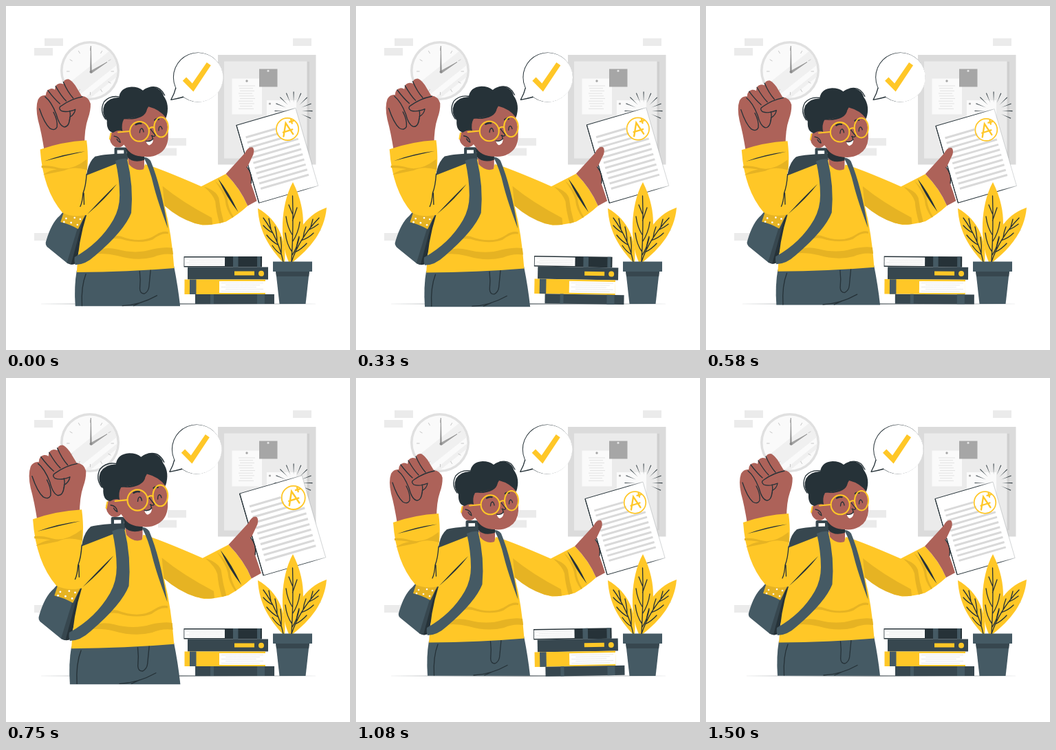
An HTML page for the animation above (1.54 s loop, 500x500 px).

```html
<!DOCTYPE html>
<html lang="en">
<head>
<meta charset="utf-8">
<title>Top grade</title>
<style>
  html, body { margin: 0; width: 100%; height: 100%; overflow: hidden; background: #fff; }
  svg { display: block; width: 100%; height: 100%; }
  .y { fill: #ffc727; }
  .shade { fill: #e6b323; }
  .ink { fill: #263238; }
  .slate { fill: #455a64; }
  .deep { fill: #37474f; }
  .skin { fill: #ad6259; }
  .line { fill: none; stroke: #263238; stroke-width: 1.3; stroke-linecap: round; stroke-linejoin: round; }
  .gold { fill: none; stroke: #ffc727; stroke-width: 2; stroke-linecap: round; }
</style>
</head>
<body>
<svg viewBox="0 0 500 500">
  <defs>
    <clipPath id="face"><circle cx="122" cy="94" r="39.5"/></clipPath>
    <linearGradient id="edge">
      <stop offset="0" stop-color="#263238"/>
      <stop offset=".75" stop-color="#263238"/>
      <stop offset="1" stop-color="#263238" stop-opacity=".2"/>
    </linearGradient>
  </defs>

  <g id="bricks" fill="#ebebeb"></g>

  <g id="clock">
    <circle cx="122" cy="94" r="43" fill="#e0e0e0"/>
    <circle cx="122" cy="94" r="39.5" fill="#fafafa"/>
    <g clip-path="url(#face)" fill="#f0f0f0">
      <path d="M84,118 L152,64 L166,82 L98,136Z"/>
      <path d="M106,140 L168,90 L170,96 L112,142Z"/>
    </g>
    <g id="ticks" stroke="#c7c7c7" stroke-width="1"></g>
    <path d="M123.3,58 L124.3,96 L122.6,96Z" fill="#8a8a8a" stroke="#8a8a8a" stroke-width=".6"/>
    <path d="M122.5,95 L147,81.5 L124.5,97.3Z" fill="#a6a6a6" stroke="#8a8a8a" stroke-width=".7"/>
    <circle cx="123.5" cy="95.8" r="2" fill="#8a8a8a"/>
  </g>

  <g id="board">
    <path d="M308,71H450.5V230.5H308Z" fill="#dbdbdb"/>
    <path d="M317,80.5H441V221.5H317Z" fill="#ebebeb"/>
    <path d="M437.5,80.5H441V221.5H437.5Z" fill="#cfcfcf"/>
    <path d="M328.5,105.5H372V157.5H328.5Z" fill="#fafafa"/>
    <g id="memo" stroke="#e0e0e0" stroke-width=".9"></g>
    <circle cx="350" cy="109" r="1.7" fill="#a6a6a6"/>
    <path d="M368,91.5H394.5V117.5H368Z" fill="#a6a6a6"/>
    <circle cx="381" cy="94.3" r="1.5" fill="#e6e6e6"/>
    <path d="M379,137H422V185H379Z" fill="#fafafa"/>
    <circle cx="383.5" cy="142" r="1.6" fill="#a6a6a6"/>
  </g>
  <g id="rays" class="ink"></g>
  <path d="M40,433 L250,432.4 L461,433 L250,433.6Z" class="ink"/>

  <g id="bubble">
    <path d="M247,119 Q245,128 240,136.3 Q250,134.5 259,132" class="line" style="fill:#fff"/>
    <circle cx="279.2" cy="103.5" r="36.1" class="ink"/>
    <circle cx="279.9" cy="103.8" r="35.8" fill="#fff"/>
    <path d="M248.2,118 L246,126 L241.6,135 L260,130.6 L262,116Z" fill="#fff"/>
    <path d="M257,108.7 L262.3,103.5 L271,112.5 L292,82 L298,86.3 L272.6,124.6Z" class="y"/>
  </g>

  <g id="person">
    <!-- backpack -->
    <path d="M161.5,218V209H175V218" fill="none" stroke="#37474f" stroke-width="4" stroke-linejoin="round"/>
    <path d="M119,250 L121,240 Q124,227 132,220 Q146,216 178,215.5 L180,240 L140,262Z" class="deep"/>
    <path d="M88,297 L122,298 L105,371 Q101,375 93,372 L66,350 Q60,346 62.5,340 Q70,314 82,304Z" class="slate"/>
    <path d="M123,298 L105,371 Q101,375 95,372.5 L113,312Z" class="ink"/>
    <path d="M116,306 L98,373 L92,371 L109,316Z" class="deep"/>
    <path d="M88,298 L119,301 L108,323 Q96,316 83,313Z" class="shade"/>
    <g id="dots" fill="#fff"></g>

    <!-- fist -->
    <path d="M60,212 Q56,186 51,168 Q47,150 51,139 Q55,132 62,133 Q62,125 69,123.5 Q73,123 75,125 Q75,117 82,116 Q85,116 87,117 Q87,110 94,110 Q98,111 104,119 L113,134 Q123,135 125.7,145 Q126,155 122,166 Q117,180 117,205Z" class="skin"/>
    <path class="line" d="M53,152 Q60,173 68,180 Q75,184 78,178 Q79,168 73,157 M61,135 Q70,142 77,160 Q81,176 88,178 Q95,178 96,166 M65,126 Q74,138 82,145 M76,120 Q84,134 91,141 M87,114 Q93,128 101,137 M114,135 Q98,138 84,148 Q79,151 84,155 Q92,158 104,153 Q103,160 96,164 M96,155 Q98,161 95,172"/>

    <!-- trousers -->
    <path d="M106,382 L244,375 Q250,405 253,432.7 H104 Q102,405 106,382Z" class="slate"/>
    <path class="line" d="M119,387 Q112,405 113.5,432 M195.5,383 Q197,395 195.7,408 Q196,415 202,415 Q208,412 208.7,405 L211,381 M171,432 Q196,431 220,417.5 M187,432 L198,427"/>

    <!-- neck -->
    <path d="M177,205 L180,234 Q190,244 202,239 L202,212Z" class="skin"/>

    <!-- sweater -->
    <path class="y" d="M54,210 Q85,199 120,197 C123,220 122,238 119,247 L165,229 Q172,226 179,224 L180,231 Q190,242 201,238 L203,231 Q222,236 283,262.5 L318,244.5 Q339,266 349,290 Q335,303 318,312.5 Q300,317.5 285,317.5 Q262,313 231,290 Q241,330 244.5,378.5 Q180,384 106,384.5 Q108,340 120,303 Q101,307 86,300 Q58,268 54,210Z"/>
    <g class="shade">
      <path d="M228,262 Q256,285 298,307 L299,316.5 Q286,318 274,315 Q250,307 231,290Z"/>
      <path d="M287,263 Q304,268 308,279 Q310,296 315,313 L309,315 Q304,298 303,284 Q300,274 287,263Z"/>
      <path d="M302,254 Q318,269 320,280 Q321,293 329,306 L327,307 Q318,295 317,282 Q314,270 302,254Z"/>
      <path d="M56,233 Q66,232 80,236 Q98,241 120,224 L121,239 Q101,233 88,240 Q74,243 58,246 Q68,239 78,238 Q66,236 56,236Z"/>
      <path d="M126,348 Q146,329 168,333 Q199,345 219,331 Q228,325 236,327 L236,330 Q226,328 214,338 Q194,345 169,337 Q149,334 126,351Z"/>
      <path d="M120,361 Q140,346 164,352 Q190,359 213,352 Q232,348 242,350 L243,359 Q228,357 215,363 Q191,369 164,361 Q140,355 120,361Z"/>
    </g>
    <path class="ink" d="M60,226.5 Q88,216 118,212.5 Q88,219 60,226.5Z M307,251.5 Q322,270 335.5,299 Q319,278 307,251.5Z M163,259 Q148,279 121,302 Q146,275 163,259Z"/>
    <path class="line" d="M120,245 Q119,262 115,272 Q114,285 111,291 M116,272 L116.5,288" stroke-width="1"/>

    <!-- straps -->
    <path class="slate" d="M161,226 Q170,222 177.5,223 Q187,262 183.5,300 Q174,325 132,361 Q118,374 104,374 Q102,370 103,363 Q139,343 158,310 Q167,294 167,275 Q167,252 161,226Z"/>
    <path class="slate" d="M201,221 Q207,221 211,226 Q226,262 235.5,322 Q221,284 215,260 Q210,238 201,221Z"/>

    <!-- head -->
    <path d="M176,207 Q183,220 202,220 L202,225 Q186,230 178,221Z" class="ink"/>
    <path d="M168,155 Q200,136 229,156 Q237,172 236,193 Q235,209 223,216 Q210,223.5 193,218.5 Q179,213 173,203 Q168,209 160,206 Q152,201 153,191 Q155,183 163,183Z" class="skin"/>
    <path d="M158,186 Q148,184 149,169 Q140,158 145.5,146 Q153,135.5 166,136 Q168,122 184,121 Q194,121 200,126 Q207,120 217,121.5 Q228,125.5 229.5,134 Q239,147 233,165 Q224,153 208,149 Q201,164 173,167 Q169,174 171,184 Q166,181 158,186Z" class="ink"/>
    <path class="line" d="M147,167 Q138,155 145,142 Q153,133 166,135 M209,122 Q224,118 231,133" stroke-width="1"/>
    <path d="M174,167 Q199,164 206,149 Q207,164 185,167Z" class="ink"/>
    <path class="line" d="M159,191 Q167,192 168,200 M163,195 Q165,199 168,200 M195.5,186 Q196,180 198.5,180 Q200.5,181 201,185 M222.5,183 Q222.5,177 225,177 Q227,178 227.5,181 M211,181 Q215,187 217.5,189 Q218,192.5 212,190.5 M213,190 L214,195"/>
    <path class="line" d="M190,174.5 Q194,172 197.5,173 M217,168 Q220,165.5 222.5,167" style="stroke-width:2.4"/>
    <path d="M204.5,198 Q210,199.5 214.5,195 Q215,202 209,204 Q205.5,203 204.5,198Z" fill="#fff"/>
    <path class="line" d="M204.5,198 Q210,199.5 214.5,195" stroke-width="1"/>
    <g class="gold">
      <ellipse cx="195.2" cy="184.3" rx="13.6" ry="14"/>
      <ellipse cx="226" cy="178.2" rx="10" ry="14.2"/>
      <path d="M209,180.5 Q212,177 216,179 M181.5,184 L165,185.5 M154.5,187 L153,195"/>
    </g>

    <!-- exam sheet -->
    <g transform="translate(333,175.5) rotate(-16.2)">
      <path d="M0,0H87.5V115H0Z" fill="#fff" stroke="url(#edge)" stroke-width=".9"/>
      <path d="M0,0V115" stroke="#263238" stroke-width="1.1"/>
      <g id="text" stroke="#d9d9d9" stroke-width="3"></g>
    </g>
    <circle cx="405.5" cy="181" r="15.8" class="gold" style="stroke-width:1.7"/>
    <path class="gold" d="M400,191.5 L403,172.5 L413.5,188 M399.5,185.5 L412.5,181.5 M408.5,170.8 L414,169.3 M410.5,167.3 L412,172.8" style="stroke-width:2.3"/>

    <!-- pointing hand -->
    <path d="M318,244.5 L345,215 Q350,205 356,207 Q359,210 357,217 L348,236 Q356,244 354,259 Q358,270 362,283 L349,290 Q339,266 318,244.5Z" class="skin"/>
    <path class="line" d="M348,235 Q356,245 354,258"/>
  </g>

  <g id="books">
    <path d="M258.5,364H372V379.5H258.5Z" class="ink"/>
    <path d="M259.3,365.5H318V378H259.3Z" fill="#fff"/>
    <path d="M330,364H337.5V379.5H330Z M365,364H370V379.5H365Z" class="slate"/>
    <path d="M264,379.5H381V397.5H264Z" class="deep"/>
    <path d="M332,385.5H361V391.5H332Z" class="y"/>
    <circle cx="371" cy="388.8" r="4" class="y"/>
    <path d="M259.5,397.5H377V419H259.5Z" class="y"/>
    <path d="M267,397.5H276.5V419H267Z" class="slate"/>
    <path d="M310,400H377V417H310Z" fill="#fff"/>
    <path d="M275,419H390V433H275Z" class="deep"/>
    <path d="M297,419H302V433H297Z M365,419H376V433H365Z" class="slate"/>
    <g id="pages" stroke="#dedede" stroke-width=".7"></g>
  </g>

  <g id="plant">
    <g class="y">
      <path d="M366,294 C368,330 384,352 402,372 H405 C408,345 398,312 366,294Z"/>
      <path d="M466,293 C432,305 417,335 414,372 H417 C442,352 463,328 466,293Z"/>
      <path d="M417,256 C398,290 398,345 411,372 H416 C435,340 439,300 417,256Z"/>
    </g>
    <path class="line" d="M415,372 Q418,320 416.5,276 M416.3,302 L411,289 M416.5,312 L423,293 M416.4,333 Q409,322 407,306 M416.2,343 Q425,330 427,314 M415.6,357 Q408,347 406,330 M415.3,363 Q423,352 426,337"/>
    <path class="line" d="M403,372 Q396,338 374,308 M385,324 L382,309 M388,330 Q380,326 374,319 M394,343 Q394,333 391,321 M395,347 Q386,342 379,333 M400,359 Q401,348 399,336 M400,361 Q393,357 387,348"/>
    <path class="line" d="M415,372 Q426,338 455,308 M443,321 L446,310 M439,326 Q448,322 454,317 M432,336 Q433,328 436,321 M429,341 Q440,337 447,330 M422,353 Q423,344 426,335 M420,358 Q430,353 437,345"/>
    <path d="M392,384H441L435.5,433H397.5Z" class="slate"/>
    <path d="M392,385H441L440.2,393H393Z" class="deep"/>
    <path d="M388,371.5H445V386H388Z" class="slate"/>
  </g>
</svg>
<script>
const $ = id => document.getElementById(id);
const range = (n, fn) => Array.from({ length: n }, (_, i) => fn(i)).join('');
const line = (x1, y1, x2, y2) => `<path d="M${x1},${y1}L${x2},${y2}"/>`;
const polar = (cx, cy, r, a) => [cx + r * Math.cos(a), cy + r * Math.sin(a)];

$('bricks').innerHTML = [[56, 47], [41, 61], [417, 47], [235, 192], [221, 206.5], [41, 330], [431, 316]]
  .map(([x, y]) => `<rect x="${x}" y="${y}" width="27" height="11"/>`).join('');

$('ticks').innerHTML = range(12, i => {
  const a = i * Math.PI / 6;
  return line(...polar(122.5, 95, 30, a), ...polar(122.5, 95, 34.5, a));
});

$('memo').innerHTML = range(10, i => line(338 + i % 3, 116 + i * 3.7, 362 - i * 3 % 5, 116 + i * 3.7));

$('rays').innerHTML = range(10, i => {
  const a = (-181 + i * 22.8) * Math.PI / 180;
  const p = [polar(418, 152, 12, a), polar(418, 152, 27.5, a - .02), polar(418, 152, 27.5, a + .02)];
  return `<path d="M${p.join('L')}Z"/>`;
});

$('dots').innerHTML = [[91, 308], [98, 314], [103, 307], [107, 317], [111, 309], [88, 313]]
  .map(([x, y]) => `<circle cx="${x}" cy="${y}" r="1.3"/>`).join('');

$('text').innerHTML = range(11, i => {
  const y = 20.4 + i * 7.58;
  return line(8, y, i < 3 ? 52 + i * 2 : 79, y);
});

$('pages').innerHTML =
  range(4, i => line(262 + i % 2 * 4, 368 + i * 2.6, 315, 368 + i * 2.6)) +
  range(5, i => line(313 + i % 2 * 6, 402.5 + i * 3, 374 - i % 3 * 5, 402.5 + i * 3));

// Linear interpolation through [percent, value] keys
function track(keys, p) {
  const i = Math.max(1, keys.findIndex(k => k[0] >= p));
  const [a, u] = keys[i - 1], [b, v] = keys[i];
  return u + (v - u) * (p - a) / (b - a);
}

const beat = [[0, 1], [10, 1.1], [30, 1], [40, 1], [50, 1.1], [60, 1], [100, 1]];
const sway = [[0, 0], [25, 1], [75, -1], [100, 0]];
const shake = [[0, 0], [10, -1], [20, 2], [30, -4], [40, 4], [50, -4], [60, 4], [70, -4], [80, 2], [90, -1], [100, 0]];

const LOOP = 1540, STEP = 1000 / 24, LEAD = 34, CYCLE = 1500;

function draw(ms) {
  const n = Math.min(36, Math.floor((ms % LOOP + 3) / STEP));
  const p = Math.min(100, (n * STEP + LEAD) / CYCLE * 100);
  $('person').setAttribute('transform', `translate(247.5,272) scale(${track(beat, p)}) translate(-247.5,-272)`);
  $('books').setAttribute('transform', `rotate(${track(sway, p)},324,398.5)`);
  $('bubble').setAttribute('transform', `translate(${track(shake, p)},0)`);
}

const start = performance.now();
function tick() {
  draw(performance.now() - start);
  requestAnimationFrame(tick);
}
tick();
</script>
</body>
</html>
```
